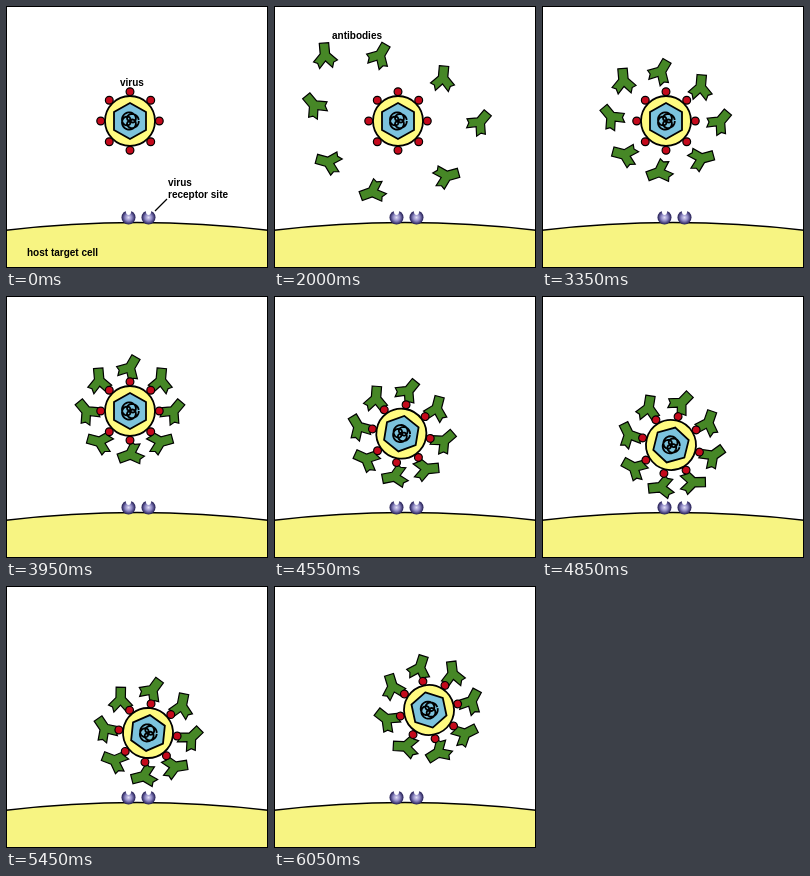
Recreate the animation shown at these times as an HTML page. Size 262x262 px, loop 8.05 s.

```html
<!DOCTYPE html>
<html>
<head>
<meta charset="utf-8">
<style>
html, body { margin: 0; height: 100%; overflow: hidden; background: #fff; }
svg { display: block; width: 100vw; height: 100vh; }
text { font: bold 10px "Liberation Sans", Arial, sans-serif; }
</style>
</head>
<body>
<svg viewBox="0 0 262 262">
  <defs>
    <radialGradient id="ball">
      <stop offset="0" stop-color="#e2dff6"/>
      <stop offset=".5" stop-color="#8c86c2"/>
      <stop offset="1" stop-color="#1f1950"/>
    </radialGradient>
    <path id="antibody" d="M-4.7-12H4.7V-1.500L12 6L8 7.800L6.500 13L0 6L-6.500 13L-8 7.800L-12 6L-4.700-1.500Z"
      fill="#468726" stroke="#000" stroke-width="1.2"/>
    <g id="receptor">
      <circle r="7" fill="url(#ball)"/>
      <path d="M-3.500-8L-2-3.500Q0-1.500 2-3.500L3.500-8Z" fill="#fff"/>
    </g>
  </defs>
  <rect width="262" height="262" fill="#fff"/>
  <path d="M-2 224.500Q131 208.500 264 224.500V264H-2Z" fill="#f7f482" stroke="#000" stroke-width="1.3"/>
  <use href="#receptor" x="122.500" y="211.500"/>
  <use href="#receptor" x="142.500" y="211.500"/>
  <g id="rider">
    <g id="swarm"></g>
    <g id="spikes" fill="#c40a1c" stroke="#000" stroke-width="1.2"></g>
    <g stroke="#000" stroke-width="1.8">
      <circle r="25" fill="#fffb80"/>
      <path d="M0-18L16-9V9L0 18L-16 9V-9Z" fill="#7cc3dd"/>
      <path id="genome" fill="none"/>
    </g>
  </g>
  <g id="intro">
    <text x="114" y="80">virus</text>
    <text x="162" y="180">virus</text>
    <text x="162" y="192">receptor site</text>
    <text x="21" y="250">host target cell</text>
    <path d="M161 193L149 205" stroke="#000" stroke-width="1.3"/>
  </g>
  <text id="label" x="58" y="33">antibodies</text>
  <rect x=".5" y=".5" width="261" height="261" fill="none" stroke="#000"/>
</svg>
<script>
const LOOP = 8050, COUNT = 8;
const $ = id => document.getElementById(id);
const mix = (a, b, k) => a + (b - a) * k;
const clamp = k => Math.min(1, Math.max(0, k));

function add(parent, tag, attrs) {
  const el = document.createElementNS('http://www.w3.org/2000/svg', tag);
  for (const k in attrs) el.setAttribute(k, attrs[k]);
  return parent.appendChild(el);
}

// Point on a ring around the virus, numbered clockwise from the top.
function ring(i, radius) {
  const a = i * 2 * Math.PI / COUNT;
  return [radius * Math.sin(a), -radius * Math.cos(a)];
}

// Where the antibodies wait, relative to the virus.
const waiting = [[45, -43], [82, 1], [49, 55], [-26, 71], [-70, 41], [-84, -16], [-73, -66], [-18, -66]];

const antibodies = waiting.map((from, n) => {
  const i = n + 1;
  const [cx, cy] = ring(i, 29.3);
  add($('spikes'), 'circle', { cx, cy, r: 3.9 });
  return {
    from,
    to: ring(i, 43.5),
    // The two sides grip their spikes with opposite prongs.
    turn: 35 * i + (i < 4 ? -30 : 110),
    el: add($('swarm'), 'use', { href: '#antibody' })
  };
});

// Tangled strand: a small circle rolling round a larger one.
const strand = [];
for (let a = 0; a <= 4 * Math.PI; a += 0.1) {
  const x = 4.8 * Math.cos(a) + 4 * Math.cos(2.5 * a);
  const y = 4.8 * Math.sin(a) + 4 * Math.sin(2.5 * a);
  strand.push(x.toFixed(2) + ' ' + y.toFixed(2));
}
$('genome').setAttribute('d', 'M' + strand.join('L'));

// Virus position and turn at the ends of each leg.
const drift = [
  { step: 6, x: 124, y: 115, turn: 0 },
  { step: 9, x: 129, y: 149, turn: 14 },
  { step: 11, x: 142, y: 147, turn: 6 },
  { step: 13, x: 155, y: 124, turn: -12 }
];

const place = (el, x, y, turn) =>
  el.setAttribute('transform', `translate(${x} ${y}) rotate(${turn})`);
const show = (id, on) => $(id).setAttribute('visibility', on ? 'visible' : 'hidden');

function draw(now) {
  const t = now % LOOP;
  const step = t < 2000 ? 0 : t < 2750 ? 1 : Math.min(13, 2 + Math.floor((t - 2750) / 300));

  const leg = Math.max(1, drift.findIndex(d => step <= d.step));
  const [a, b] = [drift[leg - 1], drift[leg]];
  const k = clamp((step - a.step) / (b.step - a.step));
  place($('rider'), mix(a.x, b.x, k), mix(a.y, b.y, k), mix(a.turn, b.turn, k));

  const near = 1 - (1 - clamp((step - 1) / 5)) ** 1.4;
  for (const { el, from, to, turn } of antibodies) {
    place(el, mix(from[0], to[0], near), mix(from[1], to[1], near), turn);
  }

  show('intro', step === 0);
  show('swarm', step > 0);
  show('label', step === 1);
  requestAnimationFrame(() => draw(performance.now() - start));
}

const start = performance.now();
draw(0);
</script>
</body>
</html>
```
